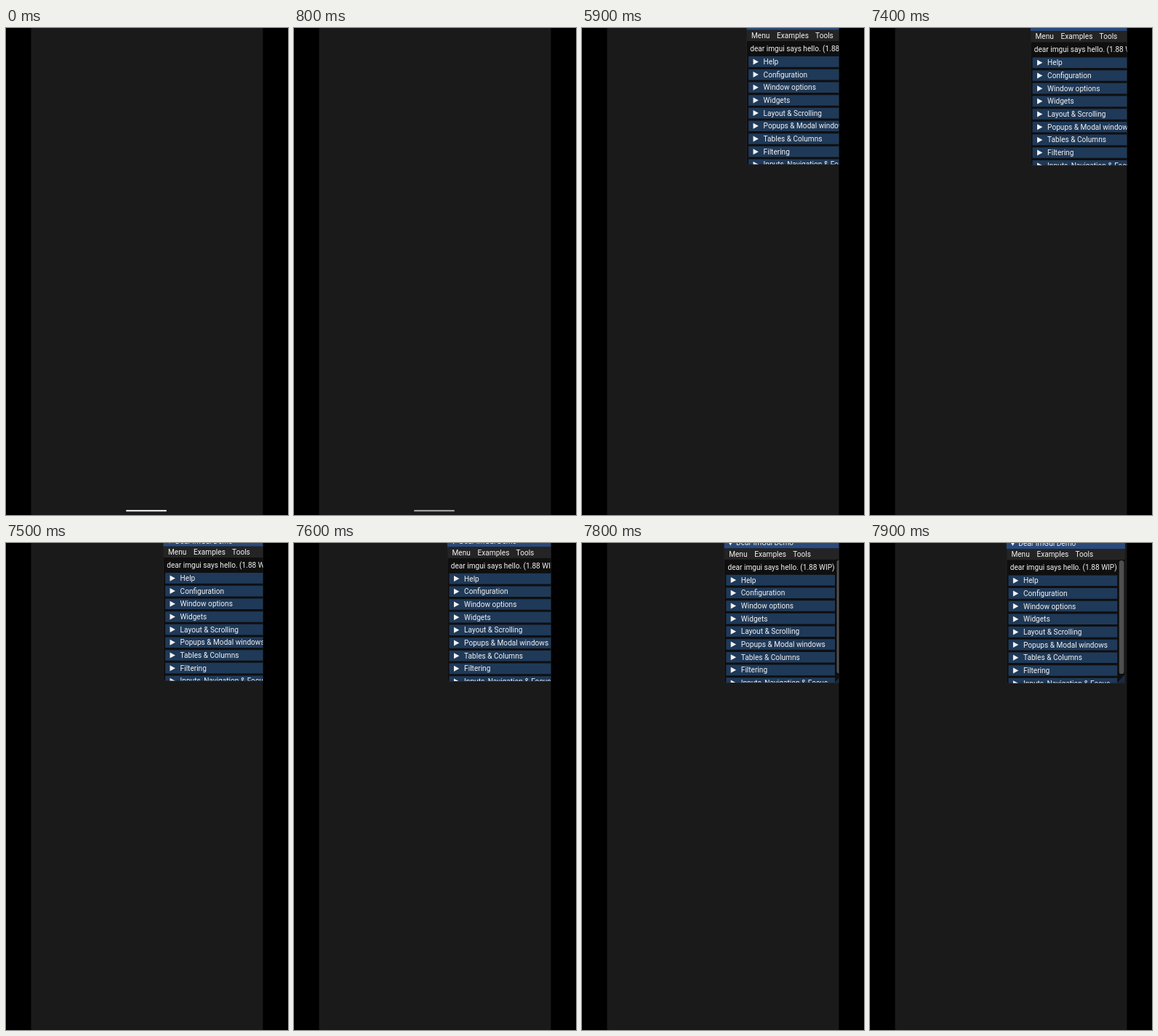
Write an HTML page with a canvas that moves like this. It is 388 by 670 pixels and loops after 8 s.

```html
<!DOCTYPE html>
<html lang="en">
<head>
<meta charset="utf-8">
<title>Panel sliding in</title>
<style>
html, body { margin: 0; width: 100%; height: 100%; overflow: hidden; background: #000; }
canvas { display: block; width: 388px; height: 670px; }
</style>
</head>
<body>
<canvas id="stage"></canvas>
<script>
const W = 388, H = 670, LOOP = 8000, STEP = 100;
const canvas = document.getElementById('stage');
const ctx = canvas.getContext('2d');
const dpr = window.devicePixelRatio || 1;
canvas.width = W * dpr;
canvas.height = H * dpr;

const ROWS = ['Help', 'Configuration', 'Window options', 'Widgets', 'Layout & Scrolling',
  'Popups & Modal windows', 'Tables & Columns', 'Filtering', 'Inputs, Navigation & Focus'];
const MENU = [['Menu', 6.7], ['Examples', 41.8], ['Tools', 94.8]];

// Window corner per step of the drag, beginning at 7400 ms
const DRAG = [[220.8, 1.4], [216.3, 2], [210.8, 2.7], [203, 4], [195.5, 4.7], [187.7, 5.3]];

function box(x, y, w, h, color, radius = 0) {
  ctx.fillStyle = color;
  ctx.beginPath();
  ctx.roundRect(x, y, w, h, radius);
  ctx.fill();
}

function tri(color, ...p) {
  ctx.fillStyle = color;
  ctx.beginPath();
  ctx.moveTo(p[0], p[1]);
  ctx.lineTo(p[2], p[3]);
  ctx.lineTo(p[4], p[5]);
  ctx.fill();
}

function label(text, x, y) {
  ctx.fillStyle = '#f2f2f2';
  ctx.fillText(text, x, y);
}

function clip(x, y, w, h) {
  ctx.beginPath();
  ctx.rect(x, y, w, h);
  ctx.clip();
}

function panel(x, y) {
  ctx.save();
  clip(35, 0, 318.5, H);
  ctx.translate(x, y);
  box(0, -13, 163.3, 201, '#29292e');
  box(0.6, -13, 162.1, 200.4, '#0f0f10');
  clip(0, -13, 163.3, 200.4);

  box(0, -13, 163.3, 15.7, '#294a7a');
  tri('#f2f2f2', 5, -7.5, 12.4, -7.5, 8.7, -1.2);
  label('Dear ImGui Demo', 16.6, -1.4);

  box(0.6, 2.7, 162.1, 15.3, '#242424');
  for (const [text, dx] of MENU) label(text, dx, 13.8);
  label('dear imgui says hello. (1.88 WIP)', 5, 31.8);

  ROWS.forEach((text, i) => {
    const mid = 46.4 + i * 17.68;
    box(2.8, mid - 7.3, 149.7, 14.6, '#1f3958');
    tri('#f2f2f2', 9.2, mid - 4, 16.6, mid, 9.2, mid + 4);
    label(text, 23.3, mid + 3.6);
  });

  box(153.6, 18, 9.1, 158, '#0a0a0a');
  box(155, 18.8, 6.8, 156, '#4f4f4f', 3.2);
  tri('#1a2b41', 162.7, 176, 162.7, 187.4, 152, 187.4);
  ctx.restore();
}

function draw(t) {
  const now = Math.floor(t / STEP) * STEP;
  ctx.setTransform(dpr, 0, 0, dpr, 0, 0);
  box(0, 0, W, H, '#000');
  box(34.5, 0, 319, H, '#1a1a1a');
  ctx.font = '10.1px Roboto, sans-serif';

  const fade = Math.min(1, Math.max(0, (1400 - now) / 900));
  if (fade > 0) {
    ctx.globalAlpha = fade;
    box(165, 663, 56, 2.3, '#e2dfe2', 1.1);
    ctx.globalAlpha = 1;
  }

  if (now >= 7400) panel(...DRAG[(now - 7400) / STEP]);
  else if (now >= 5900) panel(226.3, 0);
}

const start = performance.now();
function tick() {
  draw((performance.now() - start) % LOOP);
  requestAnimationFrame(tick);
}
tick();
</script>
</body>
</html>
```
